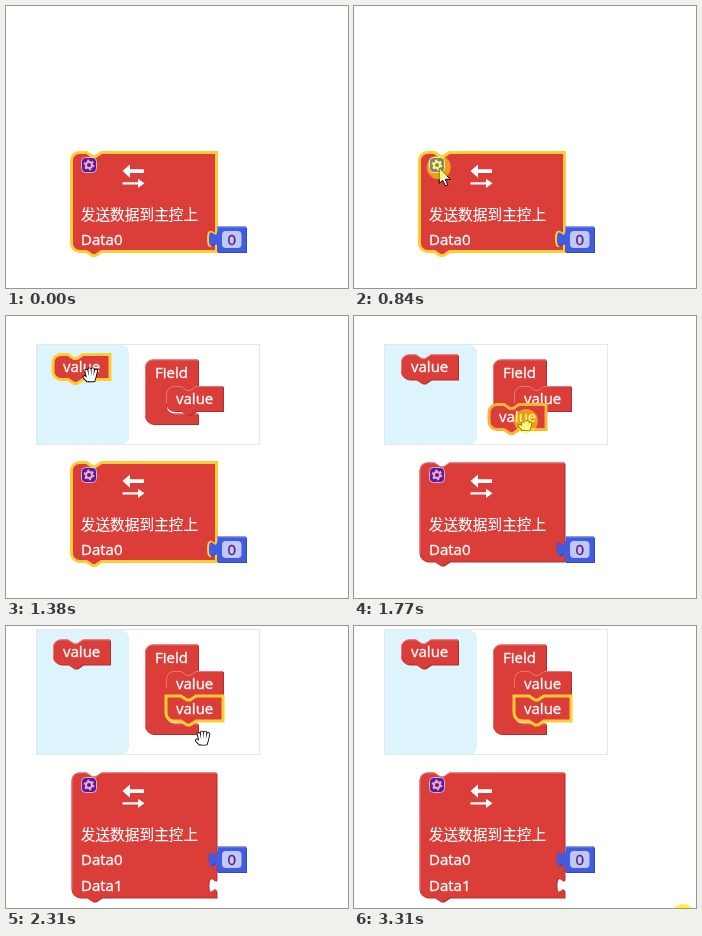
These frames come from a looping animation (342x282 px, 3.39 s). An HTML page:

```html
<!DOCTYPE html>
<html lang="zh">
<head>
<meta charset="utf-8">
<title>Mutator block</title>
<style>
html, body { margin: 0; width: 100%; height: 100%; overflow: hidden; background: #fff; }
svg { display: block; }
text { font: 15px "Open Sans", "Noto Sans", sans-serif; fill: #fff; stroke: #fff; stroke-width: .35; }
text.zh { font: 14.7px "Noto Sans CJK SC", "Noto Sans CJK", sans-serif; stroke-width: .15; }
text.num { fill: #5f1a78; stroke: #5f1a78; }
</style>
</head>
<body>
<svg id="stage" width="342" height="282" viewBox="0 0 342 282"></svg>
<script>
const LOOP = 3390, STEP = 77.05, STEPS = 44;
const RED = { fill: '#db3d39', dark: '#af312e', pale: '#e67774' };
const BLUE = { fill: '#415be1', dark: '#3449b4', pale: '#7a8cea' };
const YELLOW = '#fc3', ROW = 26, SLOT = 25, VALUE_W = 57;
const NOTCH = 'h15l6 4 3 0 6-4';
const TOP = 'M0 8A8 8 0 0 1 8 0H0' + NOTCH;
const TAB = 'H30l-6 4-3 0-6-4';
const ROUND_END = 'H8a8 8 0 0 1-8-8z';
const SOCKET = 'c0 10-8-8-8 7.5s8-2.5 8 7.5';
const stage = document.getElementById('stage');

const at = (x, y, body) => `<g transform="translate(${x} ${y})">${body}</g>`;
const label = (x, y, s, cls = '') => `<text x="${x}" y="${y}" class="${cls}">${s}</text>`;

// One block body: shade and fill, then a highlight or the selection outline.
function shape(d, light, { fill, dark, pale }, outline) {
  if (outline) return `<path d="${d}" fill="${fill}" stroke="${outline}" stroke-width="3"/>`;
  return `<path d="${d}" fill="${dark}" transform="translate(1 1)"/><path d="${d}" fill="${fill}"/>` +
    `<path d="${light}" fill="none" stroke="${pale}"/>`;
}

// Highlight along the left and top edges of a block with a notch.
const edge = (w, h) => `M.5 ${h - 8}V8A7.5 7.5 0 0 1 8 .5H15l6 4 3 0 6-4H${w}`;
const top8 = 'M0 8A8 8 0 0 1 8 0H15l6 4 3 0 6-4';

function valueBlock(x, y, { outline, squareTop, squareBottom } = {}) {
  const start = squareTop ? 'M0 0' + NOTCH : top8;
  const d = `${start}H${VALUE_W}V${SLOT}${TAB}${squareBottom ? 'H0z' : ROUND_END}`;
  return at(x, y, shape(d, edge(VALUE_W, SLOT), RED, outline) + label(10, 17.5, 'value'));
}

function fieldBlock(x, y, rows) {
  const inner = 29 + SLOT * rows, h = inner + 10.5;
  const d = `M0 8A8 8 0 0 1 8 0H53V27H51l-6 4-3 0-6-4H29a8 8 0 0 0-8 8V${inner - 8}` +
    `a8 8 0 0 0 8 8H53V${h}${ROUND_END}`;
  const light = `M.5 ${h - 8}V8A7.5 7.5 0 0 1 8 .5H53M29 ${inner + .5}H53`;
  return at(x, y, shape(d, light, RED) + label(10, 19, 'Field'));
}

function gear(hover) {
  return at(75, 151, `<g opacity="${hover ? 1 : .6}">
    <rect x=".5" y=".5" width="15" height="15" rx="4" fill="#00f" stroke="#fff"/>
    <g fill="none" stroke="#fff"><circle cx="8" cy="8" r="3" stroke-width="2"/>
    <circle cx="8" cy="8" r="4.6" stroke-width="1.6" stroke-dasharray="2.2 2.617"/></g></g>`);
}

function numberBlock() {
  const d = 'M0 0H29V25.500H0V20c0-10-8 8-8-7.5s8 2.5 8-7.5z';
  return at(211, 220.5, shape(d, 'M.5 5V.5H29', BLUE) +
    '<rect x="5" y="4.5" width="19.5" height="17" rx="4" fill="#fff" fill-opacity=".67"/>' +
    label(10.5, 18.5, '0', 'num'));
}

function mainBlock(rows, selected, hover) {
  const h = 73 + ROW * rows;
  let sockets = '', names = '';
  for (let r = 0; r < rows; r++) {
    sockets += `V${79 + ROW * r}${SOCKET}`;
    names += label(75, 239 + ROW * r, 'Data' + r);
  }
  const d = `${top8}H145${sockets}V${h}${TAB}${ROUND_END}`;
  return at(65.5, 146.4, shape(d, edge(145, h), RED, selected && YELLOW)) + gear(hover) +
    '<path fill="#fff" d="M116.5 165l7.5-6.5v4.8h14v3.6h-14v4.8zM138.5 177.3l-6.5 4.7v-3.6h-15.5v-2.2H132v-3.4z"/>' +
    label(74.7, 214, '发送数据到主控上', 'zh') + names + numberBlock();
}

function bubble(top) {
  return `<rect x="30.5" y="${top + .5}" width="223" height="${128 - top}" fill="#fff" stroke="#e6e6e6"/>
    <path d="M31 ${top + 1}H115a8 8 0 0 1 8 8V120.5a8 8 0 0 1-8 8H31z" fill="#ddf4fd"/>`;
}

const ARROW = `<path d="M.5 .5V16L4 13l2.5 5.5 2.5-1L6.500 12H11.500z" fill="#fff" stroke="#000"/>`;

// Thumb, palm and four fanned fingers, black first and white inside.
function hand(closed) {
  let d = 'M5 13L2 10M6 11.500H11V13H7z';
  for (let k = 0; k < 4; k++) {
    const tip = (closed ? 6 : 2) + (k - 1.5) ** 2 * .7;
    const spread = closed ? 2.4 : 3.2;
    d += `M${5.5 + 2 * k} 11L${8.5 + spread * (k - 1.5)} ${tip}`;
  }
  const layer = (color, width) =>
    `<path d="${d}" fill="${color}" stroke="${color}" stroke-width="${width}" stroke-linecap="round" stroke-linejoin="round"/>`;
  return at(-8, -5, layer('#000', 4) + layer('#fff', 2.3));
}

// Pointer stops: step, x, y.
const STOPS = [
  [1, 262, 261], [8, 84, 166], [12, 85, 161], [16, 85, 58], [19, 84.5, 56],
  [23, 172, 105], [25, 197, 109.5], [30, 197, 109.5], [34, 165, 151], [37, 299, 254], [43, 329, 290]
];

function pointer(n) {
  const k = Math.max(1, STOPS.findIndex(s => s[0] >= n));
  const [n0, x0, y0] = STOPS[k - 1], [n1, x1, y1] = STOPS[k];
  const f = (n - n0) / (n1 - n0);
  const ease = f * (2 - f);
  return [x0 + (x1 - x0) * f, y0 + (y1 - y0) * ease];
}

function cursor(x, y, useHand, pressed) {
  const glow = `<circle r="12" fill="#fff000" opacity="${y > 282 ? .8 : .52}"/>`;
  return at(x, y, (useHand ? hand(pressed) : ARROW) + (pressed ? glow : ''));
}

const between = (n, a, b) => n >= a && n < b;

function draw(n) {
  const opened = n >= 12, dropped = n >= 29, dragging = between(n, 20, 29);
  const hover = between(n, 8, 13);
  const pressed = between(n, 10, 12) || between(n, 19, 29) || n === 43;
  const rows = dropped ? 2 : 1, lift = dropped ? SLOT : 0;
  const [x, y] = pointer(n);
  let out = mainBlock(rows, n < 19, hover);
  if (opened) {
    out += bubble(28 - lift) +
      valueBlock(47, 38.4 - lift, { outline: between(n, 16, 20) && YELLOW }) +
      fieldBlock(139, 43.4 - lift, rows) +
      valueBlock(160, 70 - lift, { squareBottom: dropped });
  }
  if (dropped) out += valueBlock(160, 70, { outline: YELLOW, squareTop: true });
  if (dragging) {
    if (x > 180)
      out += at(160, 95.5, `<path d="M10 0h5l6 4 3 0 6-4h5" fill="none" stroke="${YELLOW}" stroke-width="4"/>`);
    out += valueBlock(x - 37, y - 16.5, { outline: '#fab534' });
  }
  const overMain = between(x, 65, 211) && between(y, 147, 272) && !hover;
  if (between(n, 1, 38) || pressed) out += cursor(x, y, overMain || between(n, 15, 33), pressed);
  stage.innerHTML = out;
}

let shown = -1;
function tick() {
  const t = performance.now() % LOOP;
  const n = Math.min(STEPS - 1, Math.floor((t + 10) / STEP));
  if (n !== shown) draw(shown = n);
  requestAnimationFrame(tick);
}
tick();
</script>
</body>
</html>
```
